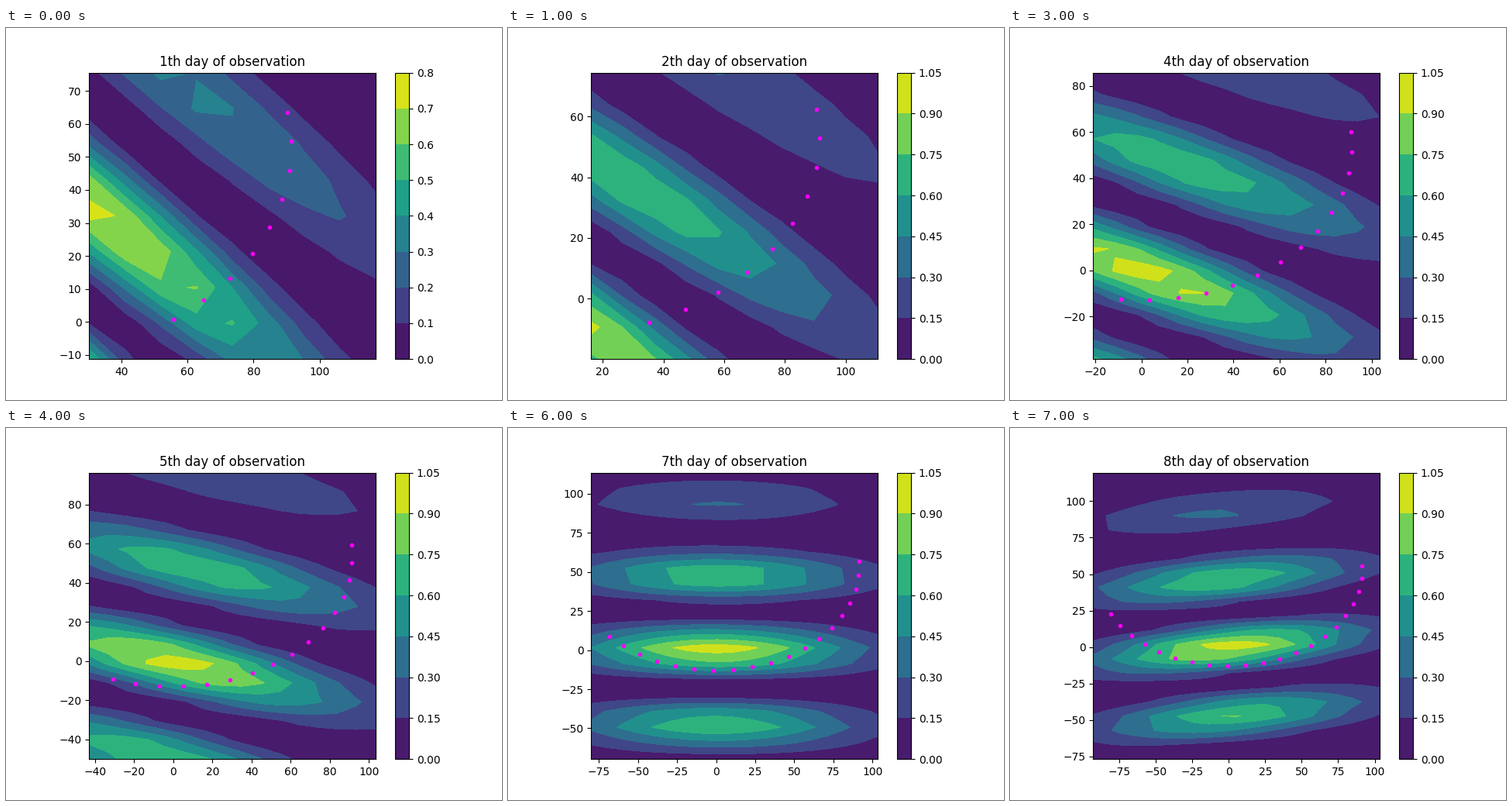
Write a matplotlib script that moves like this. It is 640 px wide and 480 px high and loops after 8000 ms.

```python
import numpy as np
import matplotlib.pyplot as plt
from matplotlib.animation import FuncAnimation

DAYS = 8
STEP = 7.6       # widest gap between observations, degrees
MARGIN = 12      # space around the track
BEAM = 90        # width of the Gaussian envelope
# hour angle at which each day's track begins, degrees
START = [37.6, 22.7, 8.5, -5.65, -19.8, -33.9, -48.1, -62.4]

fig = plt.figure(figsize=(6.4, 4.8), dpi=100)


def track(t):
    """Points observed on day t, along an arc of an ellipse."""
    end = 99.0 - 0.97 * t
    count = int((end - START[t]) / STEP) + 1
    angle = np.radians(np.linspace(START[t], end, count))
    return 91.4 * np.sin(angle), 53.2 - 66.2 * np.cos(angle)


def fringes(x, y, t):
    """Squared visibility of a pair of sources that turns slowly."""
    kx = 0.01335 - 0.0022 * t
    ky = 0.0161 + 0.000995 * t - 0.000046 * t**2
    envelope = np.exp(-(x**2 + y**2) / BEAM**2)
    return envelope * np.cos(np.pi * (kx * x + ky * y))**2


def middle(values):
    return (values.min() + values.max()) / 2


def draw(t):
    fig.clear()
    ax = fig.add_subplot()
    u, v = track(t)
    half = max(np.ptp(u), np.ptp(v)) / 2 + MARGIN
    offsets = np.linspace(-half, half, len(u))
    x, y = np.meshgrid(middle(u) + offsets, middle(v) + offsets)
    z = fringes(x, y, t)

    levels = np.linspace(0, 0.8, 9) if z.max() < 0.8 else np.linspace(0, 1.05, 8)
    filled = ax.contourf(x, y, z, levels=levels)
    fig.colorbar(filled, ax=ax)
    ax.plot(u, v, ".", color="magenta")
    ax.set_xlim(x.min(), x.max())
    ax.set_ylim(y.min(), y.max())
    ax.set_aspect("equal")
    ax.set_title(f"{t + 1}th day of observation")


anim = FuncAnimation(fig, draw, frames=DAYS, interval=1000, repeat=True, repeat_delay=0)
plt.show()
```
